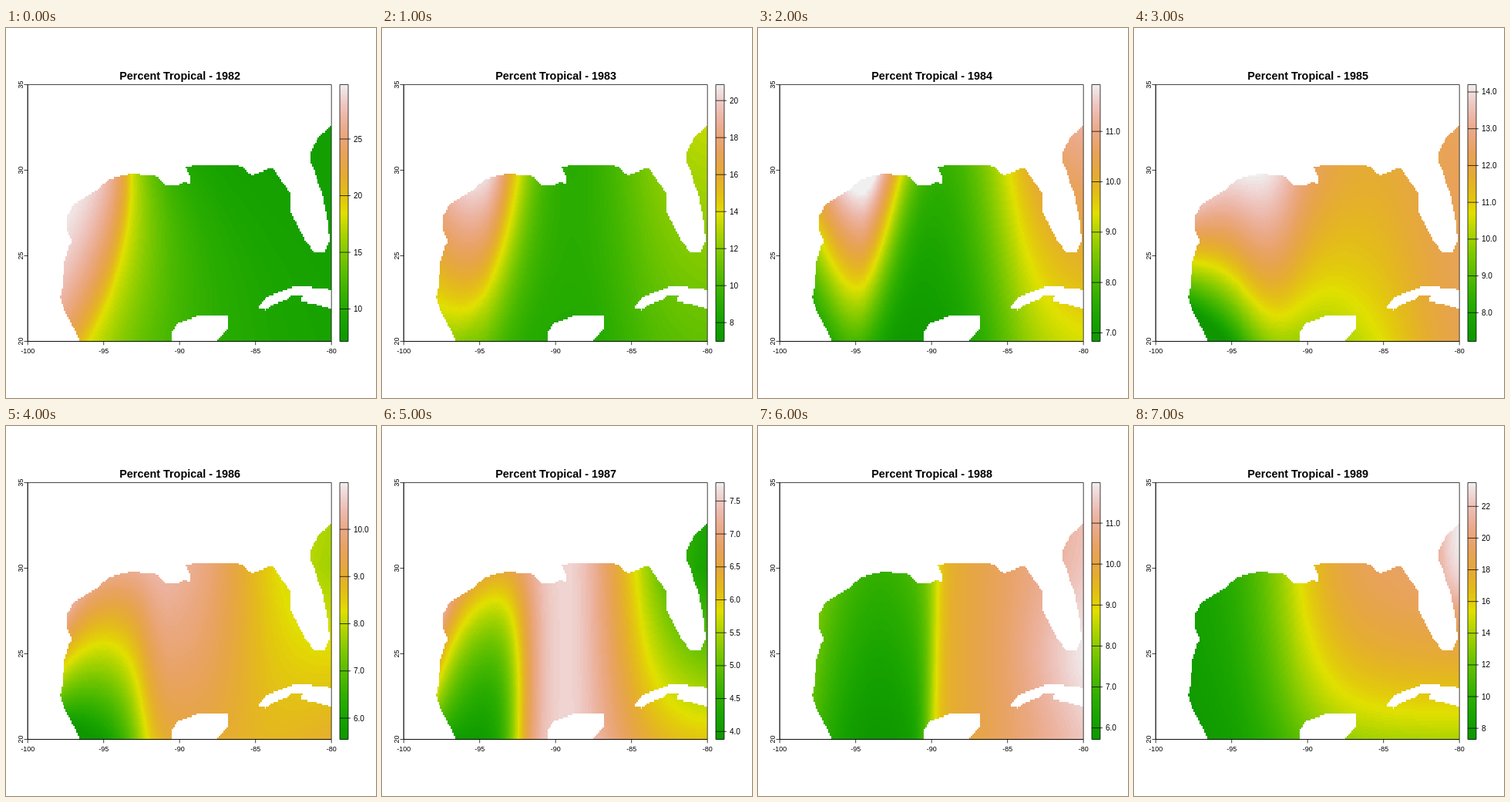
Write an HTML page with a canvas that moves like this. It is 480 by 480 pixels and loops after 8 s.

```html
<!DOCTYPE html>
<html lang="en">
<head>
<meta charset="utf-8">
<title>Percent Tropical</title>
<style>
  html, body { margin: 0; width: 100%; height: 100%; overflow: hidden; background: #fff; }
  canvas, svg { position: absolute; left: 0; top: 0; width: 480px; height: 480px; }
  text { font-family: "Liberation Sans", Arial, Helvetica, sans-serif; fill: #000; }
  path { fill: none; stroke: #000; stroke-width: .75; }
</style>
</head>
<body>
<canvas id="map" width="480" height="480"></canvas>
<svg id="chart" viewBox="0 0 480 480"></svg>
<script>
const L = 28.2, T = 73.44, W = 394, H = 333.12, COLS = 200, ROWS = 150;
const FIRST = 1982, COUNT = 8, STAY = 1000;

const { exp, sqrt, max, min, floor } = Math;
const step = (v, c, w) => 1 / (1 + exp((c - v) / w));
const bump = (v, c, w) => exp(-(((v - c) / w) ** 2));
const mix = (a, b, k) => a + (b - a) * k;
const mean = list => list.reduce((a, b) => a + b) / list.length;

// Key points of the coasts, in stage pixels
const land = [
  // mainland
  [[0, 407], [96, 407], [87, 387], [75, 364], [70, 350], [74, 330], [75, 308], [82, 284], [86, 276],
   [80, 264], [80, 244], [88, 229], [118, 210], [134, 196], [162, 189], [194, 192], [208, 205],
   [222, 205], [232, 200], [239, 202], [239, 194], [234, 181], [246, 177], [299, 177], [309, 182],
   [318, 191], [318, 0], [0, 0]],
  // peninsula
  [[318, 0], [318, 191], [341, 183], [348, 183], [354, 193], [369, 215], [368, 236], [381, 262],
   [390, 279], [401, 292], [413, 292], [420, 276], [418, 252], [411, 216], [399, 184], [394, 173],
   [394, 163], [403, 145], [423, 125], [423, 0]],
  // cape
  [[216, 410], [216, 393], [224, 383], [250, 373], [289, 373], [289, 389], [274, 407]],
  // island
  [[326, 363], [340, 348], [376, 335], [413, 338], [430, 341], [430, 367], [404, 359], [383, 355],
   [384, 347], [370, 346], [365, 352], [347, 359], [337, 366]]
];

// Range of percent and level 0..1 at e degrees east of -100, n degrees north of 20.
// A year without an entry is the mean of its neighbours.
const years = {
  1982: {
    range: [7.14, 29.8],
    level(e, n) {
      const z = (e - 4.06 - .6 * n + .0325 * n * n) / (2.4 - .15 * n);
      return z < 0 ? 1.04 - .54 * exp(z / 1.35) : .06 + .44 * exp(-z / 2.2);
    }
  },
  1984: {
    range: [6.83, 11.93],
    level(e, n) {
      const c = 4.9 + .06 * n, w = e < c ? 2 + .3 * n : 1.9 + .07 * n;
      return .01 * n + (.22 + .08 * n) * bump(e, c, w) + (.5 + .02 * n) * step(e, 14.6, 1.6);
    }
  },
  1985: {
    range: [7.22, 14.2],
    level(e, n) {
      const slope = .15 * exp((2.6 - e) / 6.5) - .008, d = n - 5;
      return .55 + .19 * bump(e, 7.4, 2.5) + .2 * step(e, 17, 1.6) + slope * (d - .04 * d * d);
    }
  },
  1987: {
    range: [3.88, 7.78],
    level(e, n) {
      const low = max(0, .55 - .055 * n);
      const ridge = e < 10.4 ? .96 : mix(low, .96, bump(e, 10.4, 4.8 + .12 * n));
      const trough = .01 * n + .005 * n * n + .2 * sqrt(n) * exp((2.5 - e) / 1.6);
      return mix(trough, ridge, step(e, 7.5 + .05 * n, .65));
    }
  },
  1988: {
    range: [5.72, 11.99],
    level(e, n) {
      const west = .018 * n + .012 * (e - 6.6) ** 2;
      const east = .6 + .03 * (e - 10) + .09 * bump(n, 5, 4) * bump(e, 20, 4);
      return mix(west, east, step(e, 9.85 + .05 * n, .35));
    }
  },
  1989: {
    range: [7.3, 23.5],
    level(e, n) {
      const height = .42 + .054 * n - .0025 * n * n;
      return .005 * n + height * step(e, 8.4, 1.9) + .25 * step(e, 18.8, .5) * step(n, 8, .8);
    }
  }
};

const sources = year => years[year] ? [years[year]] : [years[year - 1], years[year + 1]];

// Terrain palette: green, yellow, pale grey
function terrain(level) {
  const t = Math.round(min(1, max(0, level)) * 99) / 99, k = Math.abs(2 * t - 1);
  const v = t < .5 ? .9 - .25 * k : .9 + .05 * k;
  const rgb = t < .5 ? [v * (1 - k), v, 0] : [v, mix(v, v * k, k), v * k];
  const out = rgb.map(c => 255 * c ** 1.22);
  out[0] = Math.hypot(out[0], 16);
  return out.map(Math.round);
}

const ctx = document.getElementById('map').getContext('2d');
const coasts = land.map(pts => new Path2D('M' + pts.join('L') + 'Z'));

function paint(year) {
  const cv = document.createElement('canvas');
  cv.width = COLS;
  cv.height = ROWS;
  const c = cv.getContext('2d'), img = c.createImageData(COLS, ROWS), from = sources(year);
  for (let k = 0; k < COLS * ROWS; k++) {
    const u = (k % COLS + .5) / COLS, v = (floor(k / COLS) + .5) / ROWS;
    if (coasts.some(p => ctx.isPointInPath(p, L + u * W, T + v * H))) continue;
    const level = mean(from.map(y => y.level(20 * u, 15 * (1 - v))));
    img.data.set([...terrain(level), 255], k * 4);
  }
  c.putImageData(img, 0, 0);
  return cv;
}

const maps = Array.from({ length: COUNT }, (_, i) => paint(FIRST + i));

const label = (x, y, size, text, extra = '') =>
  `<text x="${x}" y="${y}" font-size="${size}" ${extra}>${text}</text>`;
const mid = 'text-anchor="middle"';

function axes() {
  let d = `M${L} ${T}v${H}h${W}`, text = '';
  for (let lon = -100; lon <= -80; lon += 5) {
    const x = L + (lon + 100) * W / 20;
    d += `M${x} ${T + H}v4.8`;
    text += label(x, 422, 9, lon, mid);
  }
  for (let lat = 20; lat <= 35; lat += 5) {
    const y = T + H - (lat - 20) * H / 15;
    d += `M${L} ${y}h-4.8`;
    text += label(22, y, 9, lat, `${mid} transform="rotate(-90 22 ${y})"`);
  }
  return `<path d="M${L} ${T}h${W}v${H}h${-W}z"/><path d="${d}"/>` + text;
}

function legend(year) {
  const [lo, hi] = [0, 1].map(i => mean(sources(year).map(y => y.range[i])));
  const gap = [.5, 1, 2, 5].find(s => (hi - lo) / s < 9);
  let d = `M433 ${T}h11v${H}h-11z`, text = '';
  for (let v = Math.ceil(lo / gap) * gap; v < hi; v += gap) {
    const y = T + H * (hi - v) / (hi - lo);
    d += `M433 ${y}h14`;
    text += label(451, y + 3.5, 10, v.toFixed(gap < 2 ? 1 : 0));
  }
  return `<path d="${d}"/>` + text;
}

const chart = document.getElementById('chart');
const frame = axes();
let shown = -1;

function draw(ms) {
  const i = floor(ms / STAY) % COUNT, year = FIRST + i;
  if (i === shown) return;
  shown = i;
  ctx.clearRect(0, 0, 480, 480);
  ctx.imageSmoothingEnabled = false;
  ctx.drawImage(maps[i], L, T, W, H);
  for (let y = 73; y < 407; y++) {
    ctx.fillStyle = `rgb(${terrain((T + H - y) / H)})`;
    ctx.fillRect(433, y, 11, 1);
  }
  chart.innerHTML = frame + legend(year) +
    label(225.6, 67, 14.4, `Percent Tropical - ${year}`, mid + ' font-weight="bold"');
}

function tick() {
  draw(performance.now());
  requestAnimationFrame(tick);
}
tick();
</script>
</body>
</html>
```
